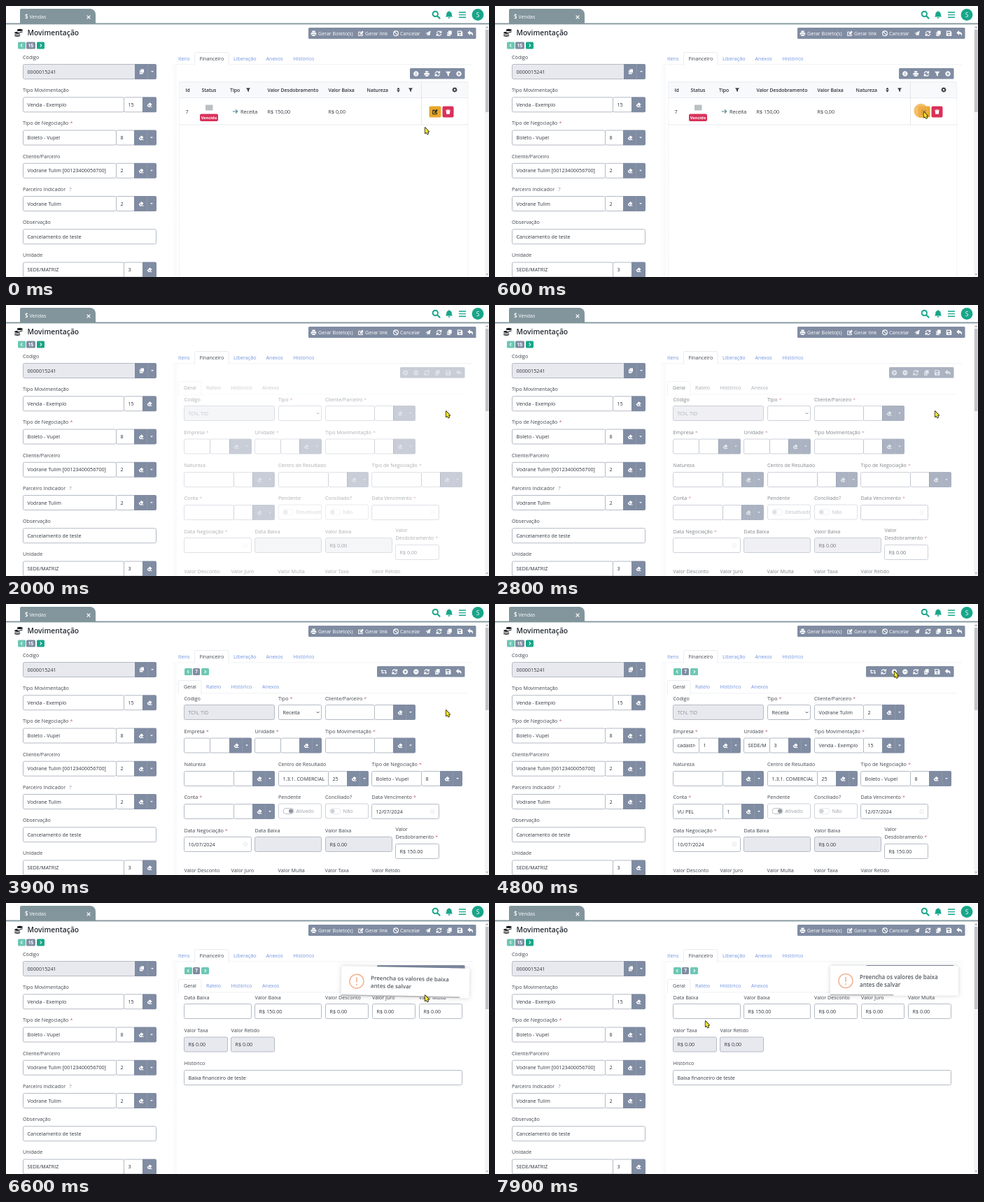
An HTML page with a canvas for the animation above (8000 ms loop, 690 by 388 pixels).

```html
<!DOCTYPE html>
<html lang="pt-BR">
<head>
<meta charset="utf-8">
<title>Movimentação</title>
<style>
html, body { margin: 0; width: 100%; height: 100%; overflow: hidden; background: #fff; }
canvas { display: block; width: 690px; height: 388px; }
</style>
</head>
<body>
<canvas id="stage"></canvas>
<script>
const W = 690, H = 388, LOOP = 8000, STEP = 100;
const canvas = document.getElementById('stage');
const c = canvas.getContext('2d');
const dpr = window.devicePixelRatio || 1;
canvas.width = W * dpr;
canvas.height = H * dpr;

const FONT = '"Open Sans", "Noto Sans", sans-serif';
const SLATE = '#808ca2', GREEN = '#18a689', MINT = '#6cc7b3', BLUE = '#7194de', STEEL = '#82959c';
const INK = '#30363f', LABEL = '#40464f', GREY = '#8d929b';
const EDGE = '#b4bac5', OFF = '#e8e9ee', RULE = '#ebedf1';
const CLIENT = 'Vodrane Tulim';

// Icons on a 16 unit grid: filled paths, or stroked ones with a line width.
const DISC = 'M8 1a7 7 0 1 0 .01 0z';
const COIN = 'a5.500 2.200 0 1 0 11 0a5.500 2.200 0 1 0-11 0z';
const BAND = 'c3 2 8 2 11 0v1.500c-3 2-8 2-11 0z';
const FILLED = {
  print: 'M4 1h8v4H4zM1 6h14v6h-2v-2H3v2H1zM4 11h8v4H4z',
  edit: 'M1 3h7v2H3v8h8V9h2v6H1zM6 8l6-7 3 3-6 7H6z',
  plane: 'M1 8L15 1 12 14 8 11 6 15 5 10 12 4 4 9z',
  copy: 'M5 1h9v10H5zM2 4h2v8h7v3H2z',
  save: 'M1 1h11l3 3v11H1zM3 3v4h8V3zM8 9a2 2 0 1 0 .01 0z',
  reply: 'M0 6L7 0v4c7 0 9 4 7 11-1-4-3-6-7-6v4z',
  info: DISC + 'M7 4h2v2H7zM7 7h2v5H7z',
  plus: DISC + 'M7 4h2v3h3v2H9v3H7V9H4V7h3z',
  minus: DISC + 'M4 7h8v2H4z',
  filter: 'M1 2h14L10 8v7l-4-3V8z',
  swap: 'M0 6l3-4 3 4H4v4h5v2H2V6zM16 10l-3 4-3-4h2V6H7V4h7v6z',
  eraser: 'M9 2l6 5-5 6h5v2H5L1 10zM4.500 9.500L7 12.500h1.500L9.500 11.500 6.500 8z',
  caret: 'M3 6h10l-5 5z',
  coins: `M5 3${COIN}M5 5.500${BAND}M0 8.500${COIN}M0 11${BAND}M0 13.500${BAND}`,
  bell: 'M8 0l1 2c3 .5 4 3 4 5 0 3 1 4 2 5H1c1-1 2-2 2-5 0-2 1-4.500 4-5zM6 13h4a2 2 0 0 1-4 0z',
  bars: 'M1 2h14v2H1zM1 7h14v2H1zM1 12h14v2H1z',
  sort: 'M4 7l4-5 4 5zM4 9h8l-4 5z',
  trash: 'M1 2h4l1-1h4l1 1h4v2H1zM2 5h12l-1 10H3z'
};
const STROKED = {
  ban: ['M14.500 8a6.500 6.500 0 1 1-13 0a6.500 6.500 0 1 1 13 0M3.500 3.500l9 9', 2],
  sync: ['M2 7a6 6 0 0 1 11-2M14 1v5h-5M14 9a6 6 0 0 1-11 2M2 15v-5h5', 2.2],
  search: ['M11 6.500a4.500 4.500 0 1 1-9 0a4.500 4.500 0 1 1 9 0M10 10l5 5', 2.4],
  gear: ['M12 8a4 4 0 1 1-8 0a4 4 0 1 1 8 0M8 1v3M8 12v3M1 8h3M12 8h3M3 3l2 2M11 11l2 2M13 3l-2 2M5 11l-2 2', 2.8],
  left: ['M10 3L5 8l5 5', 2.6],
  right: ['M6 3l5 5-5 5', 2.6],
  down: ['M3 6l5 5 5-5', 2.8],
  arrow: ['M1 8h13M9 3l5 5-5 5', 2],
  close: ['M3 3l10 10M13 3L3 13', 2.8]
};

function icon(name, x, y, color = '#fff', size = 8) {
  c.save();
  c.translate(x - size / 2, y - size / 2);
  c.scale(size / 16, size / 16);
  c.fillStyle = c.strokeStyle = color;
  if (FILLED[name]) c.fill(new Path2D(FILLED[name]), 'evenodd');
  else {
    c.lineWidth = STROKED[name][1];
    c.stroke(new Path2D(STROKED[name][0]));
  }
  c.restore();
}

// Text is placed by its left edge and the middle of its capitals.
function text(s, x, y, color = INK, size = 7.2, weight = 400, align = 'left') {
  c.font = `${weight} ${size}px ${FONT}`;
  c.textAlign = align;
  c.fillStyle = color;
  c.fillText(s, x, y + size * 0.36);
  return c.measureText(s).width;
}

function rect(x1, y1, x2, y2, fill, r = 0, edge) {
  c.beginPath();
  c.roundRect(x1, y1, x2 - x1, y2 - y1, r);
  if (fill) { c.fillStyle = fill; c.fill(); }
  if (edge) { c.strokeStyle = edge; c.lineWidth = 1; c.stroke(); }
}

function circle(x, y, r, fill, edge, width = 1) {
  c.beginPath();
  c.arc(x, y, r, 0, Math.PI * 2);
  if (fill) { c.fillStyle = fill; c.fill(); }
  if (edge) { c.strokeStyle = edge; c.lineWidth = width; c.stroke(); }
}

function label(s, x, y, required) {
  const w = text(s, x, y, LABEL);
  if (required) text('*', x + w + 2, y, '#c9707f');
}

function clipped(s, x, x1, x2, y, color) {
  c.save();
  c.beginPath();
  c.rect(x1, y - 10, x2 - x1, 20);
  c.clip();
  text(s, x, y, color);
  c.restore();
}

function input(x1, x2, y, value = '', off = false, color = INK) {
  rect(x1 + .5, y - 10.5, x2 + .5, y + 10.5, off ? OFF : '#fff', 2, EDGE);
  if (value) clipped(value, x1 + 6.5, x1, x2 - 5, y, color);
}

function button(x1, x2, y, name) {
  rect(x1, y - 11, x2 + 1, y + 11, SLATE, [0, 2, 2, 0]);
  icon(name, x1 + 10, y);
  if (x2 - x1 < 25) return;
  rect(x1 + 18.5, y - 11, x1 + 19, y + 11, 'rgba(255,255,255,.2)');
  icon('caret', x1 + 25, y - .2, '#fff', 6);
}

function combo(x1, x2, x3, x4, y, name = '', code = '') {
  input(x1, x2, y, name);
  input(x2, x3, y, code);
  button(x3, x4, y, 'eraser');
}

function toolbar(x1, names, y = 97) {
  rect(x1, y - 8, 655.5, y + 7.5, SLATE, 1.5);
  names.forEach((n, i) => icon(n, 647 - (names.length - 1 - i) * 15.3, y, '#fff', 8.5));
}

function pager(x, y, n, first, last) {
  rect(x, y - 5, x + 11, y + 5, first, 1.5);
  icon('left', x + 5.5, y, '#fff', 6.5);
  const w = n.length > 1 ? 13 : 10;
  rect(x + 12, y - 5, x + 12 + w, y + 5, SLATE, 1.5);
  text(n, x + 12 + w / 2, y, '#fff', 6.4, 700, 'center');
  rect(x + 14 + w, y - 5, x + 25 + w, y + 5, last, 1.5);
  icon('right', x + 19.5 + w, y, '#fff', 6.5);
}

function toggle(x, y, on, caption) {
  rect(x + .5, y - 10.5, x + 61.5, y + 10.5, '#fff', 2, '#cdd1d9');
  rect(x + 7, y - 4, x + 22, y + 4, '#fff', 4, on ? '#bfc2c8' : '#e6e8ec');
  circle(x + (on ? 18 : 10.5), y, 3, on ? '#90959d' : '#cfd2d7');
  clipped(caption, x + 25.5, x, x + 61, y, '#999ea7');
}

function header() {
  rect(20, 4, 128, 25, STEEL, [2, 8, 0, 0]);
  rect(0, 24.500, W, 26.500, STEEL);
  rect(0, 26.500, W, 27.500, '#eef3f4');
  text('$', 27, 15.5, '#fff', 8, 600);
  text('Vendas', 33.5, 15.5, '#fff', 7);
  icon('close', 118, 16, '#fff', 7.5);
  icon('search', 614.5, 12.6, GREEN, 13);
  icon('bell', 633, 12.6, GREEN, 12);
  icon('bars', 652, 12.6, GREEN, 11.5);
  circle(674, 12.5, 8.4, GREEN);
  text('S', 674, 12.7, '#fff', 8.5, 400, 'center');

  icon('coins', 18, 38, '#15181c', 11.5);
  text('Movimentação', 30.5, 38, '#252b33', 10.3, 600);
  pager(17, 56.500, '15', MINT, GREEN);

  rect(432, 31, 671.500, 47, SLATE, 1.5);
  [['print', 439.5], ['edit', 507], ['ban', 557], ['plane', 603], ['sync', 618.5],
    ['copy', 633.5], ['save', 648.5], ['reply', 663.5]].forEach(([n, x]) => icon(n, x, 39.3, '#fff', 8.5));
  text('Gerar Boleto(s)', 446, 39.3, '#fff', 7.1);
  text('Gerar link', 513, 39.3, '#fff', 7.1);
  text('Cancelar', 563, 39.3, '#fff', 7.1);

  rect(684, 27, W, H, '#f4f4f5');
  rect(685, 34, 689.5, 152, '#c1c3c6');
  icon('caret', 687.2, 384, '#777', 5);
  c.save();
  c.translate(687.2, 30.5);
  c.scale(1, -1);
  icon('caret', 0, 0, '#777', 5);
  c.restore();
}

function sidebar() {
  const rows = ['Código', 'Tipo Movimentação', 'Tipo de Negociação', 'Cliente/Parceiro',
    'Parceiro Indicador', 'Observação', 'Unidade'];
  const at = i => 94 + i * 47.25;
  rows.forEach((s, i) => label(s, 24, at(i) - 20.8, i === 2));
  text('?', 90.5, at(4) - 20.8, '#7c88a0');
  input(24, 184, at(0), '0000015241', true);
  button(184, 214, at(0), 'copy');
  combo(24, 168, 195, 214, at(1), 'Venda - Exemplo', '15');
  combo(24, 157, 183, 214, at(2), 'Boleto - Vupel', '8');
  combo(24, 157, 183, 214, at(3), CLIENT + ' [00123400056700]', '2');
  combo(24, 157, 183, 214, at(4), CLIENT, '2');
  input(24, 214, at(5), 'Cancelamento de teste');
  combo(24, 168, 195, 214, at(6), 'SEDE/MATRIZ', '3');
}

function panel() {
  const g = c.createLinearGradient(237, 0, 246, 0);
  g.addColorStop(0, '#fff');
  g.addColorStop(.6, '#f9fafb');
  g.addColorStop(1, '#fff');
  c.fillStyle = g;
  c.fillRect(237, 85, 9, H - 85);
  rect(238, 83.500, 667, 84.300, RULE);
  rect(269.500, 66.500, 318, 85, '#fff', [2, 2, 0, 0], RULE);
  rect(270, 83, 317.500, 86, '#fff');
  text('Itens', 246, 75.5, BLUE);
  text('Financeiro', 276.5, 75.5, LABEL);
  text('Liberação', 325, 75.5, BLUE);
  text('Anexos', 371.5, 75.5, BLUE);
  text('Histórico', 410.5, 75.5, BLUE);
}

function table() {
  toolbar(577, ['info', 'print', 'sync', 'filter', 'plus']);
  rect(247, 109, 660, 131, '#f8f9fb');
  for (const y of [108.5, 131, 169.500]) rect(247, y, 660, y + .8, '#e1e4e9');
  for (const x of [247, 659.500]) rect(x, 109, x + .7, H, '#eceef1');
  rect(593, 109, 594, 170, '#e4e6ea');
  [['Id', 256.5], ['Status', 279.5], ['Tipo', 320], ['Valor Desdobramento', 373.5],
    ['Valor Baixa', 460.5], ['Natureza', 515.5]].forEach(([s, x]) => text(s, x, 120.5, '#2c323a', 6.9, 600));
  icon('filter', 346, 120, '#2c323a', 7);
  icon('sort', 560.5, 120, '#2c323a', 9);
  icon('filter', 578, 120, '#2c323a', 7);
  icon('gear', 641, 120, '#2c323a', 8);
  text('7', 256.5, 151);
  rect(285, 141.500, 295.500, 149.500, '#b9c0c4');
  rect(277, 154.500, 303, 165, '#d9315a', 2);
  text('Vencido', 290, 159.8, '#fff', 5.7, 700, 'center');
  icon('arrow', 327.5, 151, '#4a8290', 8.5);
  text('Receita', 335, 151);
  text('R$ 150,00', 373.5, 151);
  text('R$ 0,00', 460.5, 151);
  rect(604.500, 143.500, 621.500, 159.500, '#e6a72b', 2);
  icon('edit', 613, 151.5, '#2a2417', 8.5);
  rect(623.500, 143.500, 639.500, 159.500, '#d9315a', 2);
  icon('trash', 631.5, 151.5, '#fff', 7.5);
}

function formTabs(muted) {
  const link = muted ? '#7d838c' : BLUE;
  rect(246, 127.500, 660, 128.300, RULE);
  rect(246.500, 109.500, 279, 129, '#fff', [2, 2, 0, 0], RULE);
  rect(247, 127, 278.500, 130, '#fff');
  text('Geral', 254, 118.5, LABEL);
  text('Rateio', 286, 118.5, link);
  text('Histórico', 321.5, 118.5, link);
  text('Anexos', 366, 118.5, link);
}

const EDIT_TOOLS = ['swap', 'sync', 'plus', 'minus', 'sync', 'copy', 'save', 'reply'];

function calendar(x, y) {
  circle(x, y, 2.8, null, '#e0e3e7', .8);
  rect(x - 1.500, y - .4, x + 1.500, y + .4, '#e0e3e7');
}

function entryForm(t) {
  const loaded = t >= 3000, center = t >= 3400, full = t >= 4100;
  const when = (ok, s) => ok ? s : '';
  if (loaded) {
    pager(255, 97, '7', MINT, MINT);
    toolbar(530, EDIT_TOOLS);
  } else toolbar(563, EDIT_TOOLS.slice(2));
  formTabs(!loaded);

  label('Código', 254.5, 135);
  label('Tipo', 389, 135, true);
  label('Cliente/Parceiro', 456, 135, true);
  input(254, 383, 155, 'TCN, TID', true, GREY);
  input(389, 450, 155, when(loaded, 'Receita'));
  icon('down', 445.5, 155, INK, 5.5);
  combo(456, 526, 553, 584, 155, when(full, CLIENT), when(full, '2'));

  label('Empresa', 254.5, 182, true);
  label('Unidade', 355.5, 182, true);
  label('Tipo Movimentação', 456, 182, true);
  combo(254, 291, 319, 350, 202.5, when(full, 'cadastro'), when(full, '1'));
  combo(355, 392, 419, 450, 202.5, when(full, 'SEDE/MATRIZ'), when(full, '3'));
  combo(456, 526, 553, 584, 202.5, when(full, 'Venda - Exemplo'), when(full, '15'));

  label('Natureza', 254.5, 229.5);
  label('Centro de Resultado', 389, 229.5);
  label('Tipo de Negociação', 522.5, 229.5, true);
  combo(254, 325, 352, 383, 250);
  combo(389, 460, 487, 517, 250, when(center, '1.3.1. COMERCIAL'), when(center, '25'));
  combo(522, 593, 620, 651, 250, when(loaded, 'Boleto - Vupel'), when(loaded, '8'));

  label('Conta', 254.5, 276.5, true);
  label('Pendente', 389, 276.5);
  label('Conciliado?', 456, 276.5);
  label('Data Vencimento', 522.5, 276.5, true);
  combo(254, 325, 352, 383, 297, when(full, 'VU PEL'), when(full, '1'));
  toggle(389, 296.5, loaded, loaded ? 'Ativado' : 'Desativado');
  toggle(456, 296.5, false, 'Não');
  input(522, 618, 297, when(loaded, '12/07/2024'));
  calendar(609.5, 297);

  label('Data Negociação', 254.5, 324, true);
  label('Data Baixa', 355.5, 324);
  label('Valor Baixa', 456, 324);
  label('Valor', 556.5, 322.5);
  label('Desdobramento', 556.5, 333.5, true);
  input(254, 350, 344, when(loaded, '10/07/2024'));
  calendar(342, 344);
  input(355, 450, 344, '', true);
  input(456, 551, 344, 'R$ 0.00', true);
  input(556, 618, 354, loaded ? 'R$ 150.00' : 'R$ 0.00');

  ['Desconto', 'Juro', 'Multa', 'Taxa', 'Retido'].forEach((s, i) => label('Valor ' + s, 254.5 + i * 67, 381));
}

function settleForm() {
  pager(255, 97, '7', MINT, MINT);
  toolbar(530, EDIT_TOOLS);
  formTabs(false);
  label('Data Baixa', 254.5, 135);
  label('Valor Baixa', 355.5, 135);
  input(254, 350, 155);
  input(355, 450, 155, 'R$ 150.00');
  ['Desconto', 'Juro', 'Multa'].forEach((s, i) => {
    const x = 456 + i * 67;
    label('Valor ' + s, x, 135);
    input(x, x + 61, 155, 'R$ 0.00');
  });
  ['Taxa', 'Retido'].forEach((s, i) => {
    const x = 254 + i * 67;
    label('Valor ' + s, x + .5, 182);
    input(x, x + 62, 202.5, 'R$ 0.00', true);
  });
  label('Histórico', 254.5, 229.5);
  input(254, 651, 250, 'Baixa financeiro de teste');
}

const clamp = v => Math.max(0, Math.min(1, v));
const ramp = (t, a, b) => clamp((t - a) / (b - a));
const smooth = p => p * p * (3 - 2 * p);

// Interpolates rows of [time, ...values].
function track(rows, t) {
  let i = rows.findIndex(r => r[0] > t);
  if (i < 0) return rows[rows.length - 1].slice(1);
  i = Math.max(i, 1);
  const a = rows[i - 1], b = rows[i], p = smooth(ramp(t, a[0], b[0]));
  return a.slice(1).map((v, k) => v + (b[k + 1] - v) * p);
}

// Wobble of the toast: time, shift, degrees.
const WOBBLE = [[6320, -5, 2], [6485, 0, -2], [6650, 2.5, 2], [6820, 0, 0]];

function toast(t) {
  const [dy, deg] = track(WOBBLE, t);
  c.save();
  c.translate(570.5, 111 + dy);
  c.rotate(deg * Math.PI / 180);
  c.translate(-570.5, -111);
  c.save();
  c.shadowColor = 'rgba(0,0,0,.17)';
  c.shadowBlur = 6 * dpr;
  rect(479, 90, 662, 132.500, '#fff', 2);
  c.restore();
  const left = 1 - ramp(t, 6380, 9380);
  rect(479, 130.800, 479 + 183 * left, 132.500, '#b5b6b9');
  const tint = '#f3b899';
  circle(501, 111.5, 10, null, tint, 1.6);
  rect(500.200, 105.500, 501.900, 113.200, tint, .8);
  circle(501, 116.2, 1.1, tint);
  text('Preencha os valores de baixa', 521, 106.3, '#555a60', 8, 600);
  text('antes de salvar', 521, 117.5, '#555a60', 8, 600);
  c.restore();
}

function statusBar() {
  rect(0, 380, 229, H, '#202124', [0, 2, 0, 0]);
  text('Aguardando demonstracao.vodrane.test...', 2, 384.3, '#d9dadd', 4.1);
}

const PATH = [
  [0, 598, 173.5], [100, 598, 173.5], [300, 612, 151], [800, 612, 151], [1200, 627, 146],
  [1600, 627, 146], [2000, 628, 151.5], [3900, 628, 151.5], [4700, 570, 96], [6300, 570, 96],
  [6600, 598, 131.5], [7100, 598, 197], [7400, 598, 197], [7900, 300, 168.5]
];
const ARROW = new Path2D('M.6 .6V8.800L2.400 7.200 3.800 10 5.200 9.300 4 6.500H6.200z');

function pointer(t) {
  const [x, y] = track(PATH, t);
  const press = Math.max(
    Math.min(ramp(t, 500, 600), 1 - ramp(t, 700, 900)),
    Math.min(ramp(t, 6100, 6200), 1 - ramp(t, 6300, 6500)));
  if (press > 0) {
    c.globalAlpha = press * .8;
    circle(x - 3.5, y - 1, 10.2, '#f0b04a');
    c.globalAlpha = 1;
  }
  c.save();
  c.translate(x, y);
  c.lineWidth = 1.5;
  c.lineJoin = 'round';
  c.strokeStyle = '#1c1a10';
  c.fillStyle = '#f6e62c';
  c.stroke(ARROW);
  c.fill(ARROW);
  c.restore();
}

function draw(t) {
  c.setTransform(dpr, 0, 0, dpr, 0, 0);
  c.fillStyle = '#fff';
  c.fillRect(0, 0, W, H);
  header();
  sidebar();
  panel();
  if (t < 1100) {
    c.globalAlpha = 1 - ramp(t, 700, 1100);
    table();
  } else if (t >= 1600 && t < 6400) {
    c.globalAlpha = .43 * ramp(t, 1500, 2000) + .57 * ramp(t, 2600, 3100);
    entryForm(t);
  } else if (t >= 6400) settleForm();
  c.globalAlpha = 1;
  if (t >= 6400) toast(t);
  if (t >= 900 && t < 1700) statusBar();
  pointer(t);
}

const start = performance.now();
function tick() {
  const t = (performance.now() - start) % LOOP;
  draw(Math.floor(t / STEP) * STEP);
  requestAnimationFrame(tick);
}
tick();
</script>
</body>
</html>
```
